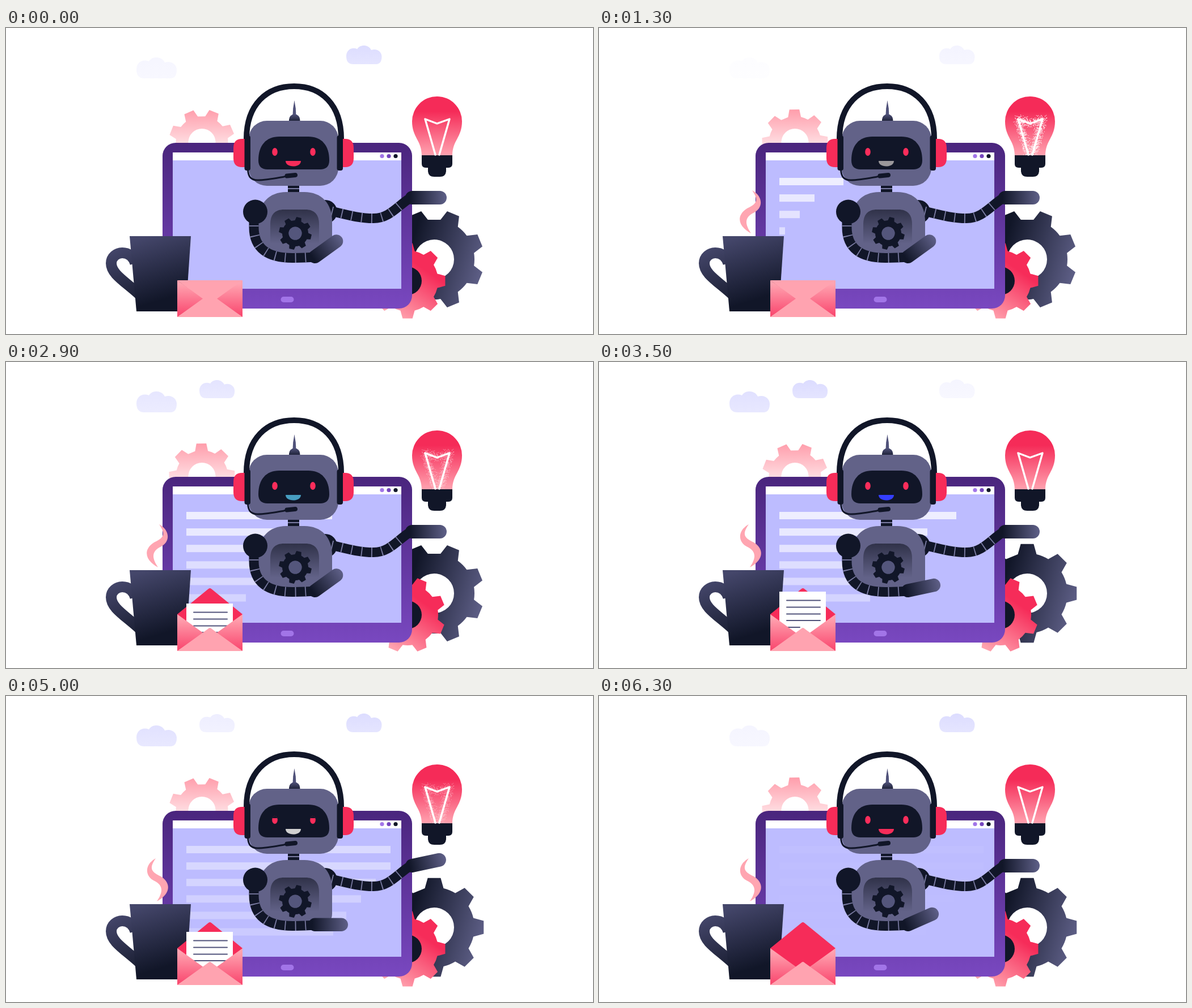
An HTML page that plays this animation: 1035x541 px, repeating every 6.4 s.

```html
<!DOCTYPE html>
<html lang="en">
<head>
<meta charset="utf-8">
<title>Robot assistant</title>
<style>
html, body { margin: 0; width: 100%; height: 100%; overflow: hidden; background: #fff; }
svg { display: block; width: 100%; height: 100%; }
.dark { fill: #111628; }
.grey { fill: #626288; }
.red { fill: #f62c59; }
.arm { fill: none; stroke: #111628; stroke-width: 17; }
.rings { fill: none; stroke: #7b7ca3; stroke-width: 17; }
.filament { fill: none; stroke: #fff; stroke-width: 3.4; stroke-linejoin: round; stroke-linecap: round; }
</style>
</head>
<body>
<svg viewBox="0 0 1035 541">
  <defs>
    <linearGradient id="tablet" x2="0" y2="1"><stop stop-color="#4a257d"/><stop offset="1" stop-color="#7948c0"/></linearGradient>
    <linearGradient id="cloudFill" x2="0" y2="1"><stop stop-color="#d9d9ff"/><stop offset="1" stop-color="#e2e2ff"/></linearGradient>
    <linearGradient id="pinkFill" gradientUnits="userSpaceOnUse" x1="0" y1="-58" x2="0" y2="5"><stop stop-color="#ff9dab"/><stop offset="1" stop-color="#ffe0e4"/></linearGradient>
    <linearGradient id="bigFill" gradientUnits="userSpaceOnUse" x1="-40" y1="-25" x2="85" y2="10"><stop stop-color="#111628"/><stop offset="1" stop-color="#5c5d84"/></linearGradient>
    <linearGradient id="smallFill" gradientUnits="userSpaceOnUse" x1="30" y1="-20" x2="-25" y2="60"><stop stop-color="#f62c59"/><stop offset="1" stop-color="#ffa3af"/></linearGradient>
    <linearGradient id="hand"><stop offset=".1" stop-color="#111628"/><stop offset="1" stop-color="#5f6088"/></linearGradient>
    <linearGradient id="mug" x1=".3" x2=".55" y2="1"><stop stop-color="#44466a"/><stop offset=".85" stop-color="#111628"/></linearGradient>
    <linearGradient id="handle" gradientUnits="userSpaceOnUse" x1="190" y1="390" x2="225" y2="480"><stop stop-color="#44466a"/><stop offset="1" stop-color="#1c2035"/></linearGradient>
    <linearGradient id="glass" x2="0" y2="1"><stop offset=".25" stop-color="#f52b58"/><stop offset="1" stop-color="#ffa3b0"/></linearGradient>
    <linearGradient id="fold" x2="0" y2="1"><stop offset=".1" stop-color="#ffa3b0"/><stop offset="1" stop-color="#f9446c"/></linearGradient>
    <linearGradient id="panel" x2="0" y2="1"><stop stop-color="#303249"/><stop offset=".85" stop-color="#626288"/></linearGradient>
    <linearGradient id="knob" x2="0" y2="1"><stop stop-color="#50527a"/><stop offset="1" stop-color="#181c30"/></linearGradient>
    <clipPath id="pocket"><path d="M302 380H417V446L359 490L302 446Z"/></clipPath>
    <path id="cloud" fill="url(#cloudFill)" d="M14 37C4 37 0 31 0 21C0 10 10 2 22 7C27-2 44-3 50 9C62 5 71 13 71 22C71 32 67 37 60 37Z"/>
  </defs>

  <use href="#cloud" id="cloudA" transform="translate(230 52)"/>
  <use href="#cloud" id="cloudB" transform="translate(341 32) scale(.875 .865)"/>
  <use href="#cloud" id="cloudC" transform="translate(600 31) scale(.88 .89)"/>

  <path id="pinkGear" transform="translate(345.5 202)" fill="url(#pinkFill)" fill-rule="evenodd"/>
  <path id="bigGear" transform="translate(755 409)" fill="url(#bigFill)" fill-rule="evenodd"/>
  <circle class="dark" cx="708" cy="447" r="27"/>
  <path id="smallGear" transform="translate(708 447)" fill="url(#smallFill)" fill-rule="evenodd"/>

  <rect x="276" y="203" width="440" height="293" rx="23" fill="url(#tablet)"/>
  <path fill="#bdbcff" d="M294 220H697V461H294Z"/>
  <path fill="#fff" d="M294 220H697V234H294Z"/>
  <circle cx="663" cy="226.500" r="3.600" fill="#a275e8"/>
  <circle cx="675" cy="226.500" r="3.600" fill="#7545be"/>
  <circle cx="687" cy="226.500" r="3.600" class="dark"/>
  <rect x="484.500" y="475" width="23" height="10" rx="5" fill="#a275e8"/>
  <g id="bars" fill="#fff"></g>

  <path id="steam" fill="#ffa5b1" d="M270 287C290 298 289 318 274 326C257 334 256 345 268 363C244 350 242 331 261 319C277 311 283 306 270 287Z"/>
  <path fill="none" stroke="url(#handle)" stroke-width="19" d="M236 472C210 448 185.500 435 185.500 416C185.500 405 195 397.500 205 397.500C215 397.500 224 403 228 416"/>
  <path fill="url(#mug)" d="M218 368H326L317 501H230Z"/>

  <g id="opened">
    <path class="red" d="M302 446L357 401Q359.500 399 362 401L417 446V490H302Z"/>
    <g clip-path="url(#pocket)">
      <g id="letter">
        <path fill="#fff" d="M318 0H400V100H318Z"/>
        <path stroke="#50527a" stroke-width="2" stroke-linecap="round" d="M331 15.500H390M331 27.500H390M331 39.500H390M331 51H390M331 63H354"/>
      </g>
    </g>
  </g>
  <path id="closed" fill="#ffa3b0" d="M302 446H417L359.500 490Z"/>
  <path fill="url(#fold)" d="M302 446L349 480L302 511ZM417 446L370 480L417 511Z"/>
  <path fill="#ffa3b0" d="M302 511L356 472Q359.500 468 363 472L417 511Z"/>

  <circle class="dark" cx="563" cy="325" r="21"/>
  <path class="arm" d="M570 323C600 330 622 336.500 648 336.500C676 336.500 690 315 712 301"/>
  <path class="rings" stroke-dasharray="1.800 16" stroke-dashoffset="-22" d="M570 323C600 330 622 336.500 648 336.500C676 336.500 690 315 705 306"/>
  <rect id="rightHand" x="704" y="288" width="73" height="24" rx="12" fill="url(#hand)"/>

  <path class="dark" d="M497 277H517V292H497Z"/>
  <path stroke="#7b7ca3" stroke-width="2" d="M497 284H517"/>
  <path class="grey" d="M445 342C445 310 464 290 494 290H526C556 290 575 310 575 342V385C575 398 567 405 552 405H480C459 405 445 390 445 370Z"/>
  <path fill="url(#panel)" d="M466 392V347C466 329 475 321 490 321H528C543 321 552 329 552 347V392Z"/>
  <path id="chestGear" class="dark" transform="translate(510 363)" fill-rule="evenodd"/>
  <circle cx="510" cy="363" r="11.500" fill="#54567c"/>
  <path class="arm" d="M437 330V352C437 390 462 406.500 505 406.500C520 406.500 532 406 546 405"/>
  <path class="rings" stroke-dasharray="1.800 16" stroke-dashoffset="-19" d="M437 330V352C437 390 462 406.500 505 406.500C515 406.500 523 406 530 405.500"/>
  <circle class="dark" cx="439.500" cy="325" r="21.500"/>
  <rect id="leftHand" x="533" y="392.500" width="70" height="23.500" rx="11.750" fill="url(#hand)"/>

  <path fill="#50527a" d="M508.500 128Q511.500 142 511.500 155H505.500Q505.500 142 508.500 128Z"/>
  <path fill="url(#knob)" d="M499 166V162A9.700 9.700 0 0 1 518.400 162V166Z"/>
  <rect class="grey" x="428" y="164" width="158" height="115" rx="32"/>
  <path class="dark" d="M445 234C445 207 459 192 482 192H533C556 192 570 207 570 234C570 245 564 250 554 250H461C451 250 445 245 445 234Z"/>
  <g id="eyes">
    <ellipse cx="474" cy="219" rx="4.800" ry="7" fill="#fc2d5b"/>
    <ellipse cx="541" cy="219" rx="4.800" ry="7" fill="#fc2d5b"/>
    <path id="lids" stroke="#111628" stroke-width="14"/>
    <g id="lashes" fill="none" stroke="#fc2d5b" stroke-dasharray="1 2" opacity=".4">
      <ellipse cx="474" cy="219" rx="4.800" ry="7"/>
      <ellipse cx="541" cy="219" rx="4.800" ry="7"/>
    </g>
  </g>
  <path id="mouth" d="M493 235H520C520 241 514 244.500 506.500 244.500S493 241 493 235Z"/>
  <path class="red" d="M421 196H416Q401 196 401 212V230Q401 246 416 246H421ZM593 196H598Q613 196 613 212V230Q613 246 598 246H593Z"/>
  <path fill="none" stroke="#111628" stroke-width="10" d="M424 196C424 135 460 103 508 103S591 135 591 196"/>
  <rect class="dark" x="420.500" y="190" width="10.500" height="62" rx="4"/>
  <rect class="dark" x="583.500" y="190" width="10.500" height="62" rx="4"/>
  <path fill="none" stroke="#111628" stroke-width="3" d="M426.500 250C427 262 431 269 444 269C460 269 478 265 496 262"/>
  <path stroke="#111628" stroke-width="8" stroke-linecap="round" d="M495.500 261.500L510 260"/>

  <path fill="url(#glass)" d="M733 226C733 198 716 194 716 165A44 44 0 0 1 804 165C804 194 787 198 787 226Z"/>
  <path class="dark" d="M733 225H787V240Q787 247 780 247H776V252Q776 263 765 263H755Q744 263 744 252V247H740Q733 247 733 240Z"/>
  <path id="glow" stroke="#fff" stroke-width="1"/>
  <path class="filament" d="M757 224L739 161L760 169L782 161L764 224"/>
</svg>
<script>
const $ = id => document.getElementById(id);
const LOOP = 64, STEP = 100; // ticks per loop, ms per tick

// Piecewise linear value at tick n through [tick, value] points.
function track(n, ...points) {
  let [t0, v0] = points[0];
  for (const [t, v] of points) {
    if (n <= t) return t > t0 ? v0 + (v - v0) * (n - t0) / (t - t0) : v;
    [t0, v0] = [t, v];
  }
  return v0;
}

// Eight-toothed gear around the origin, turned by deg.
function gear(outer, inner, hole, deg, tip = .13, root = .235) {
  const at = (r, a) => `${(r * Math.sin(a)).toFixed(2)} ${(-r * Math.cos(a)).toFixed(2)}`;
  let d = '';
  for (let i = 0; i < 8; i++) {
    const a = deg * Math.PI / 180 + i * Math.PI / 4;
    d += (i ? `A${inner} ${inner} 0 0 1 ` : 'M') + at(inner, a - root) +
      `L${at(outer, a - tip)}L${at(outer, a + tip)}L${at(inner, a + root)}`;
  }
  return d + `ZM${-hole} 0a${hole} ${hole} 0 1 0 ${2 * hole} 0a${hole} ${hole} 0 1 0 ${-2 * hole} 0Z`;
}

// Grainy light scattered around the filament.
function grain() {
  let seed = 7, d = '';
  const rnd = () => (seed = seed * 16807 % 2147483647) / 2147483647;
  const pts = [[757, 224], [739, 161], [760, 169], [782, 161], [764, 224]];
  for (let i = 0; i < 1300; i++) {
    const u = rnd(), k = u < .37 ? 0 : u < .5 ? 1 : u < .63 ? 2 : 3;
    const [a, b] = [pts[k], pts[k + 1]], s = rnd();
    const off = () => (rnd() + rnd() + rnd() - 1.5) * 8;
    const x = a[0] + (b[0] - a[0]) * s + off(), y = Math.min(224, a[1] + (b[1] - a[1]) * s + off());
    d += `M${x.toFixed(1)} ${y.toFixed(1)}h1`;
  }
  return d;
}

const shifts = [51, 0, -26, -52, -78, -101];
const bars = shifts.map((_, i) => {
  const bar = document.createElementNS('http://www.w3.org/2000/svg', 'rect');
  const attrs = { x: 318, y: 265 + 29.1 * i, height: 13, opacity: .75 - .08 * i };
  for (const k in attrs) bar.setAttribute(k, attrs[k]);
  return $('bars').appendChild(bar);
});
$('chestGear').setAttribute('d', gear(29, 23, 11.5, 13, .15, .25));
$('glow').setAttribute('d', grain());

const set = (id, name, value) => $(id).setAttribute(name, value);
const show = (id, on) => set(id, 'visibility', on ? 'visible' : 'hidden');
const phase = (n, cycles) => n * cycles / LOOP % 1;

const moods = [[0, 246, 44, 89], [13, 155, 152, 155], [23, 90, 252, 128], [35, 52, 62, 255],
  [43, 255, 0, 255], [50, 208, 208, 208], [63, 246, 44, 89]];

function draw(n) {
  set('cloudA', 'opacity', track(n, [0, .25], [13, .06], [23, .5], [35, .8], [43, .8], [50, .78], [63, .27]));
  set('cloudB', 'opacity', track(n, [0, 0], [14, 0], [23, .5], [35, .92], [43, .8], [50, .45], [61, 0]));
  set('cloudC', 'opacity', track(n, [0, .9], [13, .3], [20, 0], [30, 0], [35, .25], [43, .65], [50, .9], [63, .9]));

  set('pinkGear', 'd', gear(58.5, 46, 24, phase(n, 8) < .5 ? 21.5 : -1, .15, .25));
  set('bigGear', 'd', gear(88, 71, 35, phase(n, 16) < .5 ? 22.5 : 0));
  const p = phase(n, 10);
  set('smallGear', 'd', gear(67, 54, 25, p > .06 && p < .56 ? 22.5 : 0));

  const edge = track(n, [0, 265], [13, 380], [23, 469], [35, 579], [43, 645], [47, 678]);
  bars.forEach((bar, i) =>
    bar.setAttribute('width', Math.max(0, Math.min(678, edge + shifts[i]) - 318)));
  set('bars', 'opacity', track(n, [44, 1], [50, .6], [63, .05]));

  show('steam', n > 3);
  set('steam', 'transform', phase(n, 5) < .5 ? '' : 'translate(534) scale(-1 1)');

  const open = n >= 16;
  show('opened', open);
  show('closed', !open);
  set('letter', 'transform', `translate(0 ${track(n, [16, 490], [23, 448], [35, 406], [39, 392], [43, 393], [50, 417], [61, 492])})`);

  set('leftHand', 'transform', `rotate(${track(n, [33, -36], [36, 0], [61, 0], [64, -36])} 545 404)`);
  set('rightHand', 'transform', `rotate(${track(n, [49, 0], [52, -36], [58, -36], [61, 0])} 716 300)`);

  const lid = track(n, [20, 211], [22, 227], [24, 227], [26, 211], [41, 211], [43, 220],
    [44.6, 227], [47.5, 227], [50, 216], [51, 211]);
  set('lids', 'd', `M474 210V${lid}M541 210V${lid}`);
  show('lashes', lid > 211);

  const rgb = [1, 2, 3].map(c => Math.round(track(n, ...moods.map(m => [m[0], m[c]]))));
  set('mouth', 'fill', `rgb(${rgb})`);

  set('glow', 'opacity', track(n, [5, 0], [10, 1], [27, 1], [31, 0], [37, 0], [41, 1], [47, 1], [50, .4], [54, 0]));
}

const start = performance.now();
(function tick() {
  draw(Math.floor(Math.max(0, performance.now() - start) / STEP) % LOOP);
  requestAnimationFrame(tick);
})();
</script>
</body>
</html>
```
